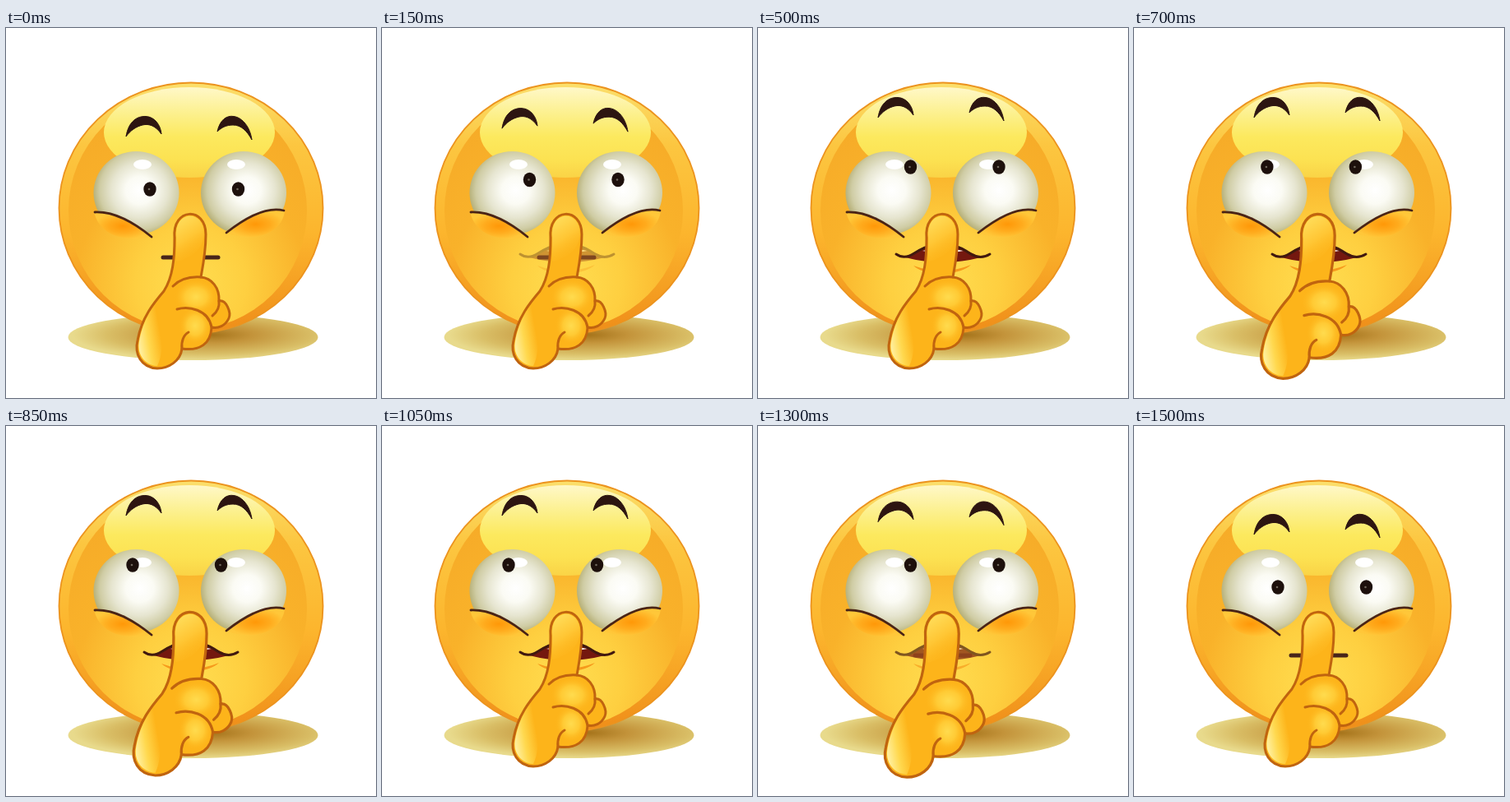
An HTML page for the animation above (2.4 s loop, 450 by 450 pixels).

```html
<!DOCTYPE html>
<html lang="en">
<head>
<meta charset="utf-8">
<title>Hush</title>
<style>
html, body { margin: 0; width: 100%; height: 100%; overflow: hidden; background: #fff; }
svg { display: block; width: 100vw; height: 100vh; }
</style>
</head>
<body>
<svg viewBox="0 0 450 450">
  <defs>
    <radialGradient id="shadow" cx=".57" cy=".45" r=".55">
      <stop offset="0" stop-color="#a5731a"/><stop offset=".3" stop-color="#c3933a"/>
      <stop offset=".75" stop-color="#d9be66"/><stop offset="1" stop-color="#e8da8c"/>
    </radialGradient>
    <linearGradient id="rim" x2="0" y2="1">
      <stop offset="0" stop-color="#fbdf6c"/><stop offset=".25" stop-color="#fcc640"/>
      <stop offset=".6" stop-color="#fcb52d"/><stop offset="1" stop-color="#ef8d19"/>
    </linearGradient>
    <radialGradient id="face" gradientUnits="userSpaceOnUse" cx="225" cy="310" r="225">
      <stop offset="0" stop-color="#ffdd50"/><stop offset=".3" stop-color="#fecf40"/>
      <stop offset=".62" stop-color="#f9b22a"/><stop offset="1" stop-color="#f6ab28"/>
    </radialGradient>
    <linearGradient id="gloss" x2="0" y2="1">
      <stop offset="0" stop-color="#fff8c8"/><stop offset=".3" stop-color="#fcf08c"/>
      <stop offset=".55" stop-color="#fce95e"/><stop offset=".8" stop-color="#fce252"/>
      <stop offset="1" stop-color="#fad346"/>
    </linearGradient>
    <radialGradient id="eye" cx=".54" cy=".47" r=".55">
      <stop offset="0" stop-color="#fff"/><stop offset=".3" stop-color="#fbfbf4"/>
      <stop offset=".6" stop-color="#e6e5d0"/><stop offset=".85" stop-color="#cfcca4"/>
      <stop offset="1" stop-color="#b5af76"/>
    </radialGradient>
    <radialGradient id="pouch" cx=".5" cy=".52" r=".5">
      <stop offset="0" stop-color="#ff9808"/><stop offset=".5" stop-color="#ffab1d"/>
      <stop offset="1" stop-color="#ffc739"/>
    </radialGradient>
    <linearGradient id="tip" x1=".2" x2=".6" y2="1">
      <stop offset="0" stop-color="#ffde5c"/><stop offset=".5" stop-color="#ffc634"/>
      <stop offset="1" stop-color="#fdb41a" stop-opacity="0"/>
    </linearGradient>
    <radialGradient id="fist">
      <stop offset="0" stop-color="#ffdb4e"/><stop offset=".5" stop-color="#ffca34"/>
      <stop offset="1" stop-color="#fdb41a" stop-opacity="0"/>
    </radialGradient>
    <linearGradient id="shine" x1=".1" y1=".9" x2=".9" y2=".5">
      <stop offset="0" stop-color="#fff0a0"/><stop offset=".45" stop-color="#ffd84e"/>
      <stop offset="1" stop-color="#fdb41a"/>
    </linearGradient>
    <ellipse id="ball" rx="52" ry="50.5" fill="url(#eye)"/>
    <g id="pupil">
      <ellipse rx="7.7" ry="8.8" fill="#1d100c"/>
      <circle cx="-1" r="1.3" fill="#6f675c"/>
    </g>
  </defs>

  <ellipse cx="227.5" cy="376" rx="152" ry="28" fill="url(#shadow)"/>
  <ellipse cx="225" cy="219" rx="160.5" ry="152.5" fill="url(#rim)" stroke="#ec931e" stroke-width="1.8"/>
  <ellipse cx="221" cy="222" rx="145" ry="145" fill="url(#face)"/>
  <ellipse cx="223" cy="127" rx="104" ry="55" fill="url(#gloss)"/>

  <g id="brows" fill="#2d1511" stroke="#2d1511">
    <path d="M146 132C149 113 160 107 170 107.500C181 108 188 118 189 129C182 119 174 116 166 118C158 120 151 125 146 132Z"/>
    <path d="M257 126C260 112 268 106 277 107.500C288 109 297 121 299 136C293 125 286 118 276 118C268 118 262 121 257 126Z"/>
  </g>

  <use href="#ball" x="158.5" y="200.5"/>
  <use href="#ball" x="289" y="200.5"/>
  <g fill="#fff">
    <ellipse cx="166" cy="166" rx="11" ry="6"/>
    <ellipse cx="280" cy="166" rx="11" ry="6"/>
  </g>
  <g id="pupils"><use href="#pupil"/><use href="#pupil" x="107.5"/></g>

  <g fill="url(#pouch)">
    <path d="M107 224C133 223 156 237 177 254C150 260 115 256 107 224Z"/>
    <path d="M268 249C287 234 314 216 339 223C335 251 300 262 268 249Z"/>
  </g>
  <g fill="none" stroke="#4a2416" stroke-width="2.8" stroke-linecap="round">
    <path d="M108 224C133 223 156 237 177 254"/>
    <path d="M268 249C287 234 314 216 338 222"/>
  </g>

  <path id="flat" d="M191 279H258" stroke="#48251a" stroke-width="5" stroke-linecap="round"/>
  <g id="open">
    <path d="M189 289Q225 302 259 288Q250 297 225 299Q198 298 189 289Z" fill="#f69a1c"/>
    <path d="M179 279Q197 268 212 265Q225 269 238 265Q254 270 271 279Q225 291 179 279Z" fill="#74180f"/>
    <path d="M200 271Q225 265 250 271Q225 276 200 271Z" fill="#fff"/>
    <path d="M168 275Q178 282 190 274Q204 265 212 265Q225 269 238 265Q246 266 259 275Q271 282 282 275"
      fill="none" stroke="#41190f" stroke-width="3" stroke-linecap="round"/>
  </g>

  <g id="hand" fill="none" stroke="#c0640f" stroke-width="3" stroke-linecap="round" stroke-linejoin="round">
    <path id="shape" fill="#fdb41a" d="M205 255C202 218 243 217 243 251C243 272 240 287 237 303C250 304 260 316 259 332C268 330 274 346 271 353C267 362 258 366 250 364C249 384 236 393 214 390C212 405 198 414 184 414C164 413 156 396 160 380C165 352 180 334 192 320C203 303 205 280 205 255Z"/>
    <g stroke="none">
      <path fill="url(#tip)" d="M207 255C204 221 241 220 241 251C240 268 226 280 207 284Z"/>
      <ellipse cx="231" cy="327" rx="27" ry="22" fill="url(#fist)"/>
      <ellipse cx="230" cy="362" rx="20" ry="23" fill="url(#fist)"/>
      <path fill="url(#shine)" d="M190 327C184 352 196 388 184 411C168 410 159 396 162 381C167 354 178 339 190 327Z"/>
    </g>
    <path d="M203 314C211 306 222 302 237 303M208 342C222 338 246 342 250 364M214 390C213 381 216 373 222 370M259 332C260 340 256 346 251 350"/>
  </g>
</svg>
<script>
const LOOP = 2400, STEP = 50;
const $ = id => document.getElementById(id);

// Each key is [time, value]; values run straight from key to key.
const tracks = {
  brow:   [[0, 0], [350, -23], [1200, -23], [1500, 0]],
  pupilX: [[0, 175], [350, 185.5], [550, 185.5], [750, 154], [1050, 154], [1250, 185.5], [1300, 185.5], [1500, 175]],
  pupilY: [[0, 196], [350, 169], [1300, 169], [1500, 196]],
  open:   [[0, 0], [450, 1], [1200, 1], [1500, 0]],
  push:   [[0, 0], [550, 0], [750, 1], [1050, 0], [1250, 1], [1500, 0]]
};

function valueAt(keys, t) {
  const next = keys.findIndex(key => key[0] > t);
  if (next < 0) return keys.at(-1)[1];
  const [t0, v0] = keys[next - 1], [t1, v1] = keys[next];
  return v0 + (v1 - v0) * (t - t0) / (t1 - t0);
}

function draw(now) {
  const t = Math.floor(now % LOOP / STEP) * STEP;
  const at = name => valueAt(tracks[name], t);
  $('brows').setAttribute('transform', `translate(0 ${at('brow')})`);
  $('pupils').setAttribute('transform', `translate(${at('pupilX')} ${at('pupilY')})`);
  $('open').setAttribute('opacity', at('open'));
  $('flat').setAttribute('opacity', 1 - at('open'));
  $('hand').setAttribute('transform', `translate(225 227) scale(${1 + .088 * at('push')}) translate(-225 -227)`);
}

const start = performance.now();
function tick() {
  draw(performance.now() - start);
  requestAnimationFrame(tick);
}
tick();
</script>
</body>
</html>
```
